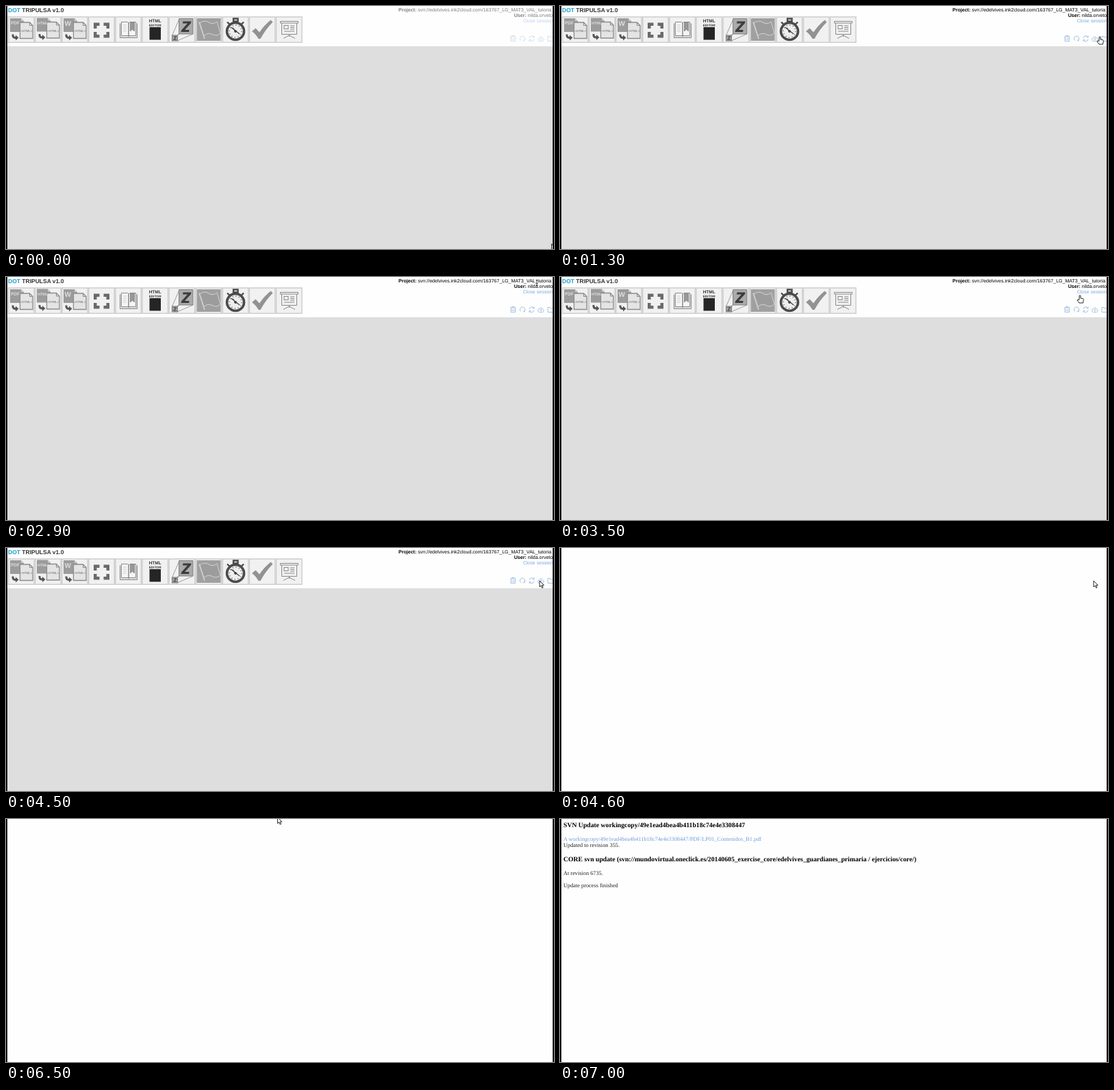
These frames come from a looping animation (800 px wide and 356 px high, 7.1 s). An HTML page:

```html
<!DOCTYPE html>
<html lang="en">
<head>
<meta charset="utf-8">
<title>Repository update</title>
<style>
html, body { margin: 0; width: 100%; height: 100%; overflow: hidden; background: #fefefe; }
svg { display: block; width: 800px; height: 356px; text-rendering: geometricPrecision; white-space: pre; }
.ui { font-family: "Liberation Sans", Arial, sans-serif; font-size: 7.07px; }
.bold { font-weight: bold; }
.title { font-size: 8.5px; font-weight: bold; fill: #333; }
.log { font-family: "Liberation Serif", "Times New Roman", serif; font-size: 8.3px; fill: #222; }
.log .head { font-size: 9.72px; font-weight: bold; fill: #000; }
.cell { fill: #f1f1f1; stroke: #cbcbcb; stroke-width: 1.4; }
.line { fill: none; stroke: #8a8a8a; }
.small { fill: none; stroke: #8fb3da; stroke-width: .8; }
.tag { font-size: 4.4px; fill: #666; text-anchor: middle; }
.kind { font-size: 6.5px; font-weight: bold; fill: #ddd; }
.pointer > * { fill: #fff; stroke: #111; stroke-width: .9; stroke-linejoin: round; }
</style>
</head>
<body>
<svg viewBox="0 0 800 356">
  <defs>
    <g id="convert">
      <path d="M3 2H19L23 6V22H3Z" fill="#9c9c9c"/>
      <path d="M19 2V6H23Z" fill="#ccc"/>
      <path d="M17.5 8H31.5L36 12.5V31.5H17.5Z" fill="#e4e4e4" stroke="#8c8c8c" stroke-width="1.3"/>
      <path d="M31.500 8V12.500H36" class="line"/>
      <text x="26.700" y="22" class="tag">&lt;HTML&gt;</text>
      <path d="M5.500 25.500H8.500Q8 29 11 29V26.500L15.500 30.500L11 34.500V32Q5 32.500 5.500 25.500Z" fill="#555"/>
    </g>
    <path id="corner" d="M-11.500 -11H-3V-6.500H-7V-2.500H-11.500Z"/>
  </defs>

  <g id="app" class="ui">
    <rect width="800" height="59" fill="#fefefe"/>
    <rect y="59" width="800" height="297" fill="#dedede"/>
    <text x="3" y="9.200" class="title"><tspan fill="#1d9cc9">DOT</tspan> TRIPULSA v1.0</text>
    <g id="cells"></g>

    <g transform="translate(3 16)"><use href="#convert"/><text x="4" y="11" class="kind">PDF</text></g>
    <g transform="translate(42 15.500)"><use href="#convert"/><text x="4" y="11" class="kind" style="font-size:5.500px">HTML</text></g>
    <g transform="translate(81 16)"><use href="#convert"/><text x="4.500" y="12.500" class="kind" style="font-size:10px">W</text></g>

    <g transform="translate(139.500 35.500)" fill="#6a6a6a">
      <use href="#corner"/><use href="#corner" transform="scale(-1 1)"/>
      <use href="#corner" transform="scale(1 -1)"/><use href="#corner" transform="scale(-1)"/>
    </g>

    <g class="line">
      <path d="M166.500 25.500V46.500H191.500V25.500" fill="#ddd"/>
      <path d="M168.500 23.500H177.500L179 25L180.500 23.500H189.500V43.500H168.500Z" fill="#f6f6f6"/>
      <path d="M179 25V45" stroke-width="1.500"/>
      <path d="M181.500 24V37L184.500 34L187.500 37V24Z" fill="#999"/>
      <path d="M171 28H176M171 31H176M171 34H176M171 37H176" stroke="#ccc"/>
    </g>

    <g class="bold" fill="#333" text-anchor="middle">
      <text x="217.700" y="23.700" style="font-size:6.500px">HTML</text>
      <text x="217.700" y="29.500" style="font-size:4.800px">EDITOR</text>
      <rect x="209.500" y="31" width="16.500" height="18.500" fill="#252525"/>
    </g>

    <g>
      <path d="M253 19L242.500 43M273 41L250 51M253 41L242.500 51M273 19L250 43" class="line" stroke-width=".8"/>
      <path d="M252.500 18.500H273V41H252.500Z" fill="#aaa" stroke="#808080"/>
      <path d="M258.500 22.500H270.500L270 25L261 35H267.500L267 38H255.500L256 35.500L265 25.500H258Z" fill="#3c3c3c"/>
      <rect x="242.500" y="43" width="8" height="8" fill="#aaa" stroke="#777"/>
      <path d="M244.500 45H249L244.500 49H249" fill="none" stroke="#333"/>
    </g>

    <rect x="278.500" y="18" width="35" height="33" fill="#a0a0a0"/>
    <g stroke="#d2d2d2">
      <path d="M282 23.500L290 48" stroke-width="1.500"/>
      <path d="M283 25Q290 20 296 24T308 23L313 40Q307 45 301 41.500T289 43.500Z" fill="#9c9c9c"/>
    </g>

    <g fill="none" stroke="#4a4a4a">
      <path d="M332 18.500H338.500V22.500H332ZM323 23.500L326.500 27M347 23.500L343.500 27" stroke-width="2.400"/>
      <circle cx="335" cy="37" r="12.500" fill="#eee" stroke-width="3.600"/>
      <circle cx="335" cy="37" r="9" stroke="#777" stroke-width="1.800" stroke-dasharray="1.200 3.512"/>
      <path d="M328.500 31L341 41M335 37L331 32" stroke-width="1.500"/>
      <circle cx="335" cy="37" r="1.500" fill="#444"/>
    </g>

    <path d="M359 37L364.500 32.500L370 38.500Q377 28 386.500 20.500L389.500 23.500Q379 34 371.500 48H368.500Q364.500 41 359 37Z" fill="#929292"/>

    <g class="line">
      <path d="M400.500 22.500H426.500V25H400.500ZM402.500 25V41.500H424.500V25M413.500 41.500V45M405 47.500L413.500 43L422 47.500"/>
      <rect x="406" y="28.500" width="6" height="5"/>
      <path d="M415 29H421M415 31.500H421M415 34H421M406 37H421"/>
    </g>

    <g id="account">
      <text x="573" y="7.600"><tspan class="bold">Project:</tspan> svn://edelvives.ink2cloud.com/163767_LG_MAT3_VAL_tutoria</text>
      <text x="741.700" y="16"><tspan class="bold">User:</tspan> nilda.orveto</text>
      <text x="754.700" y="24.300" fill="#7ba9de">Close session</text>
      <g class="small">
        <path d="M736 45H744.500M738.500 45V43.500H742V45M737 45.500V51.500H743.500V45.500M739 47V50M741.500 47V50"/>
        <path d="M751.500 50.500A3.700 3.700 0 1 1 756.500 50.500M754.800 50.800H757V48.600"/>
        <path d="M764 47A3.700 3.700 0 0 1 770.800 45.500M771 43.500V46H768.500M771 48.500A3.700 3.700 0 0 1 764.200 50M764 52V49.500H766.500"/>
        <path d="M778.500 51.500A2.300 2.300 0 0 1 778.300 47A2.700 2.700 0 0 1 783.400 47A2.300 2.300 0 0 1 783.200 51.500ZM781 50.500V47.500M779.700 48.800L781 47.300L782.300 48.800"/>
        <path d="M791 51.500V44.500H794L795 46H800V51.500Z"/>
      </g>
    </g>
  </g>

  <g id="log" class="log">
    <text x="5" y="12" class="head">SVN Update workingcopy/49e1ead4bea4b411b18c74e4e3308447</text>
    <text x="5" y="31.700" fill="#6f9fdb">A workingcopy/49e1ead4bea4b411b18c74e4e3308447/PDF/LP01_Contenidos_B1.pdf</text>
    <text x="5" y="41.300">Updated to revision 355.</text>
    <text x="5" y="62" class="head">CORE svn update (svn://mundovirtual.oneclick.es/20140605_exercise_core/edelvives_guardianes_primaria / ejercicios/core/)</text>
    <text x="5" y="81.700">At revision 6735.</text>
    <text x="5" y="99.800">Update process finished</text>
  </g>

  <g id="pointer" class="pointer">
    <path id="arrow" d="M.5 .5V9.500L2.600 7.600L4.100 11L5.600 10.300L4.100 7.100H6.800Z"/>
    <path id="hand" d="M-1 6V1Q0 -.5 1 1V4.500L4.500 5.200Q5.500 5.500 5.300 7L4.500 11.500H-1L-4 7.500Q-3.500 5.500 -1 7Z"/>
    <path id="beam" d="M-1.300 0H1.300M0 0V8M-1.300 8H1.300" stroke-width=".7"/>
  </g>
  <path d="M0 0H2V356H0ZM798 0H800V356H798Z" fill="#111"/>
</svg>
<script>
const LOOP = 7100, STEP = 100;
const el = id => document.getElementById(id);

el("cells").innerHTML = Array.from({ length: 11 }, (_, i) =>
  `<rect class="cell" x="${3.5 + i * 39.1}" y="16" width="37.500" height="37.300"/>`).join("");

// time, x, y, shape shown from that time on
const path = [
  [0, 796, 348, "arrow"], [400, 792, 190, "arrow"], [800, 786, 54, "arrow"],
  [1000, 786, 54, "arrow"], [1200, 788, 48, "hand"], [1300, 788, 44.5, "hand"],
  [1400, 787, 50, "hand"], [1500, 787, 50, "hand"], [1800, 781, 50, "hand"],
  [1900, 781, 50, "hand"], [2100, 782, 47, "hand"], [2300, 782, 47, "hand"],
  [2500, 782, 48, "hand"], [2600, 782, 48, "hand"], [2800, 777, 20, "arrow"],
  [2900, 775, 4.5, "beam"], [3100, 774, 1, "beam"], [3400, 768, 17, "hand"],
  [3600, 750, 36, "arrow"], [3700, 745, 46, "hand"], [3900, 772, 51, "hand"],
  [4100, 778.5, 47.5, "arrow"], [5700, 778.5, 47.5, "arrow"], [5800, 382, 48.5, "arrow"],
  [6000, 190, 42, "arrow"], [6100, 126, 34, "arrow"], [6300, 250, 20, "arrow"],
  [6500, 396, -3, "arrow"], [6600, 396, -20, "arrow"]
];

function pose(t) {
  const next = path.findIndex(p => p[0] > t);
  if (next < 0) return path.at(-1).slice(1);
  const [t0, x0, y0, shape] = path[next - 1], [t1, x1, y1] = path[next];
  const k = (t - t0) / (t1 - t0);
  return [x0 + (x1 - x0) * k, y0 + (y1 - y0) * k, shape];
}

const show = (id, on) => { el(id).style.display = on ? "" : "none"; };

function draw(now) {
  const t = Math.floor((now - start) % LOOP / STEP) * STEP;
  const [x, y, shape] = pose(t);
  show("app", t < 4600);
  show("log", t >= 6800);
  show("pointer", t < 6600);
  for (const id of ["arrow", "hand", "beam"]) show(id, id === shape);
  el("pointer").setAttribute("transform", `translate(${x} ${y})`);
  el("account").style.opacity = 0.5 + 0.5 * Math.min(t / 800, 1);
}

const start = performance.now();
function tick() {
  draw(performance.now());
  requestAnimationFrame(tick);
}
tick();
</script>
</body>
</html>
```
